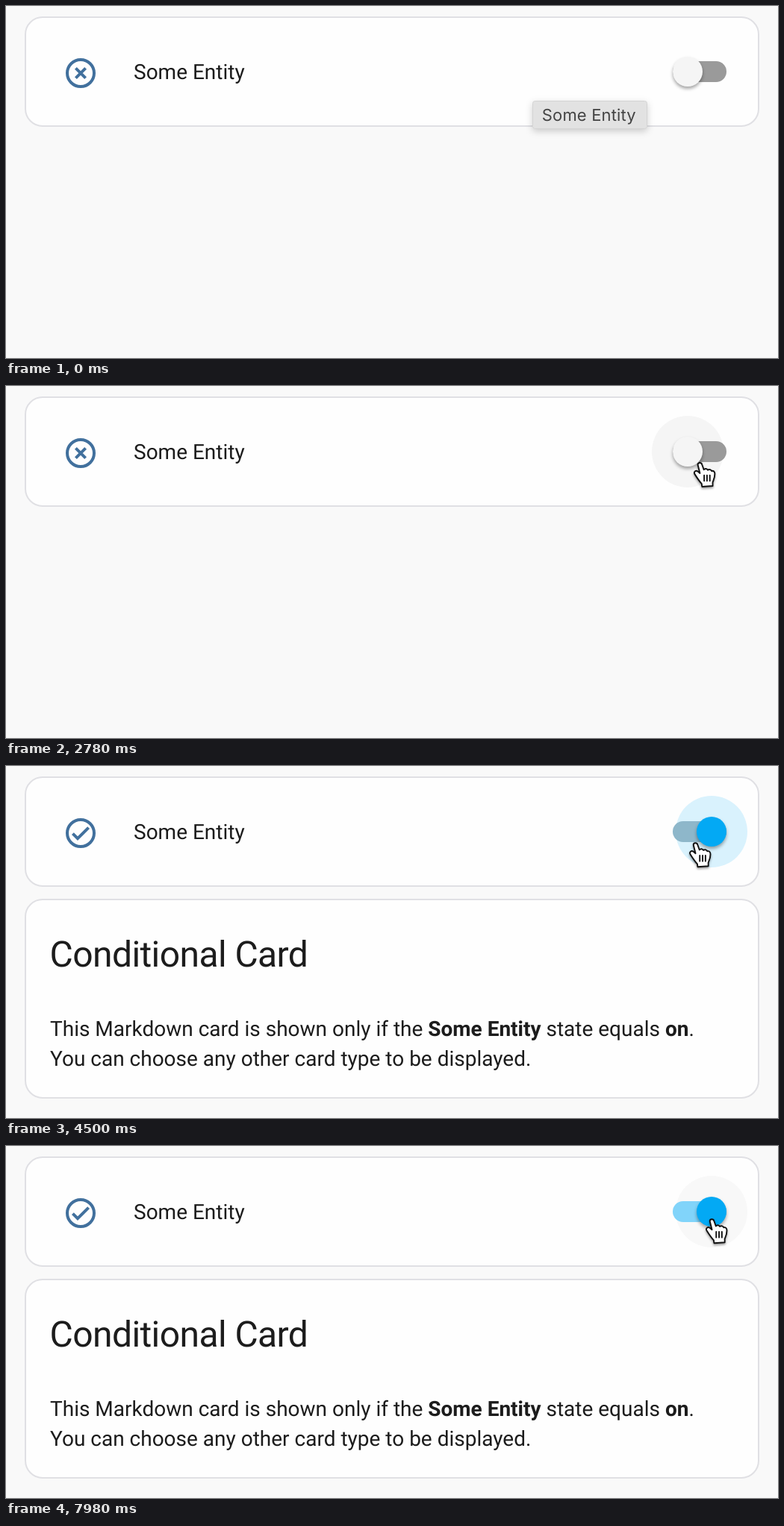
An HTML page for the animation above (8000 ms loop, 1034x472 px).

```html
<!DOCTYPE html>
<html lang="en">
<head>
<meta charset="utf-8">
<title>Conditional card</title>
<style>
  html, body { margin: 0; width: 100%; height: 100%; overflow: hidden; background: #f9f9f9; }
  svg { display: block; width: 1034px; height: 472px; font: 28px Roboto, sans-serif; fill: #1c1c1c; text-rendering: geometricPrecision; }
  .card { fill: #fefefe; stroke: #e0e0e4; stroke-width: 2; }
  .icon { fill: none; stroke: #41709d; stroke-width: 4; }
  .title { font-size: 48px; letter-spacing: -.012em; }
  .bold { font-weight: 700; }
  #tip rect { fill: #e2e2e2; stroke: #d4d4d4; filter: drop-shadow(0 3px 5px #00000030); }
  #tip text { font: 22px Inter, sans-serif; letter-spacing: .15px; fill: #444; }
  #thumb { filter: drop-shadow(0 3px 2px #00000058); }
  .cursor { filter: drop-shadow(0 2px 1.5px #00000060); stroke-linejoin: round; }
  #hand { fill: #fff; stroke: #111; stroke-width: 2; stroke-linecap: round; }
  #arrow { fill: #000; stroke: #fff; stroke-width: 3; paint-order: stroke; }
</style>
</head>
<body>
<svg viewBox="0 0 1034 472">
  <rect class="card" x="26" y="15" width="982" height="146" rx="23"/>
  <g class="icon">
    <circle cx="100" cy="90" r="18"/>
    <path id="cross" d="M93.4 83.4l13.2 13.2m0-13.2l-13.2 13.2"/>
    <path id="check" d="M89.4 90.6L96 97.2L110.6 82.6"/>
  </g>
  <text x="171" y="98">Some Entity</text>

  <g id="panel">
    <rect class="card" x="26" y="179" width="982" height="266" rx="23"/>
    <text class="title" x="58.5" y="269">Conditional Card</text>
    <text x="59" y="362">This Markdown card is shown only if the <tspan class="bold">Some Entity</tspan> state equals <tspan class="bold">on</tspan>.</text>
    <text x="59" y="402">You can choose any other card type to be displayed.</text>
  </g>

  <circle id="ripple" cy="88" r="48"/>
  <rect id="track" x="893" y="74" width="72" height="28" rx="14"/>
  <circle id="thumb" cy="88" r="20"/>

  <g id="tip">
    <rect x="705.5" y="127.5" width="153" height="37" rx="3"/>
    <text x="717.8" y="154">Some Entity</text>
  </g>

  <path id="arrow" class="cursor" d="M0 0V28L6.5 22L11 32.5L16 30.5L11.5 20.5L20 20Z"/>
  <g id="hand" class="cursor">
    <g transform="scale(.95)">
      <path d="M6 4C6 1 11 0 12 4L14.5 11C16 9 19 9.5 20 11.5C22 10 25 11 25.5 13C28 12 30 14 30 17C30 23 28 26 27 29V34L12 35L11.5 31C8 27 4 21 1.5 17C0 14 3 11.5 6 13.5L9 16Z"/>
      <path d="M15 19v8m4-8v8m4-8v8"/>
    </g>
  </g>
</svg>
<script>
const LOOP = 8000;
// Moments on the step clock
const TIP_FADE = 36, ENTER = 48, PRESS = 81, TOGGLE = 96, SLIDE = 112;

const GREY = [245, 245, 245], PRESSED = [237, 237, 237];
const CYAN = [3, 169, 244], GLOW = [217, 242, 253];
const TRACK_OFF = [154, 154, 154], TRACK_ON = [129, 212, 250];

const el = id => document.getElementById(id);
const set = (id, attrs) => {
  for (const key in attrs) el(id).setAttribute(key, attrs[key]);
};
const show = (id, visible) => set(id, { visibility: visible ? 'visible' : 'hidden' });
const ramp = (t, from, length) => Math.min(1, Math.max(0, (t - from) / length));
const smooth = p => p * p * (3 - 2 * p);
const mix = (a, b, p) => a + (b - a) * p;
const blend = (a, b, p) => `rgb(${a.map((v, i) => mix(v, b[i], p))})`;

// Playback cadence: three steps every 140 ms, held for 100, 20 and 20 ms
function stepAt(ms) {
  const shifted = ms + 120, rest = shifted % 140;
  return Math.floor(shifted / 140) * 3 + (rest >= 100) + (rest >= 120);
}

function draw(step) {
  const on = smooth(ramp(step, TOGGLE, 3));
  const toggled = step >= TOGGLE + 2;
  const enter = 1 - (1 - ramp(step, ENTER, 17)) ** 2;
  const slide = smooth(ramp(step, SLIDE, 15));
  const x = mix(mix(1021, 915, enter), 937, slide);
  const y = mix(mix(97, 102, enter), 97, slide ** 2);
  const present = step >= ENTER;
  const hover = present && x < 955;
  const thumbX = mix(913, 945, on);

  set('tip', { opacity: 1 - ramp(step, TIP_FADE, 4) });
  show('cross', !toggled);
  show('check', toggled);
  show('panel', toggled);

  show('ripple', hover);
  set('ripple', {
    cx: thumbX,
    fill: on < .5 ? blend(GREY, PRESSED, ramp(step, PRESS, 6))
                  : blend(GLOW, [248, 248, 248], ramp(step, TOGGLE + 3, 5))
  });
  set('track', { fill: blend(TRACK_OFF, TRACK_ON, ramp(step, TOGGLE + 1, 4)) });
  set('thumb', { cx: thumbX, fill: blend(GREY, CYAN, on) });

  show('arrow', present && !hover);
  show('hand', hover);
  set('arrow', { transform: `translate(${x} ${y})` });
  set('hand', { transform: `translate(${x} ${y})` });
}

const start = performance.now();
function frame() {
  draw(stepAt((performance.now() - start) % LOOP));
  requestAnimationFrame(frame);
}
frame();
</script>
</body>
</html>
```
